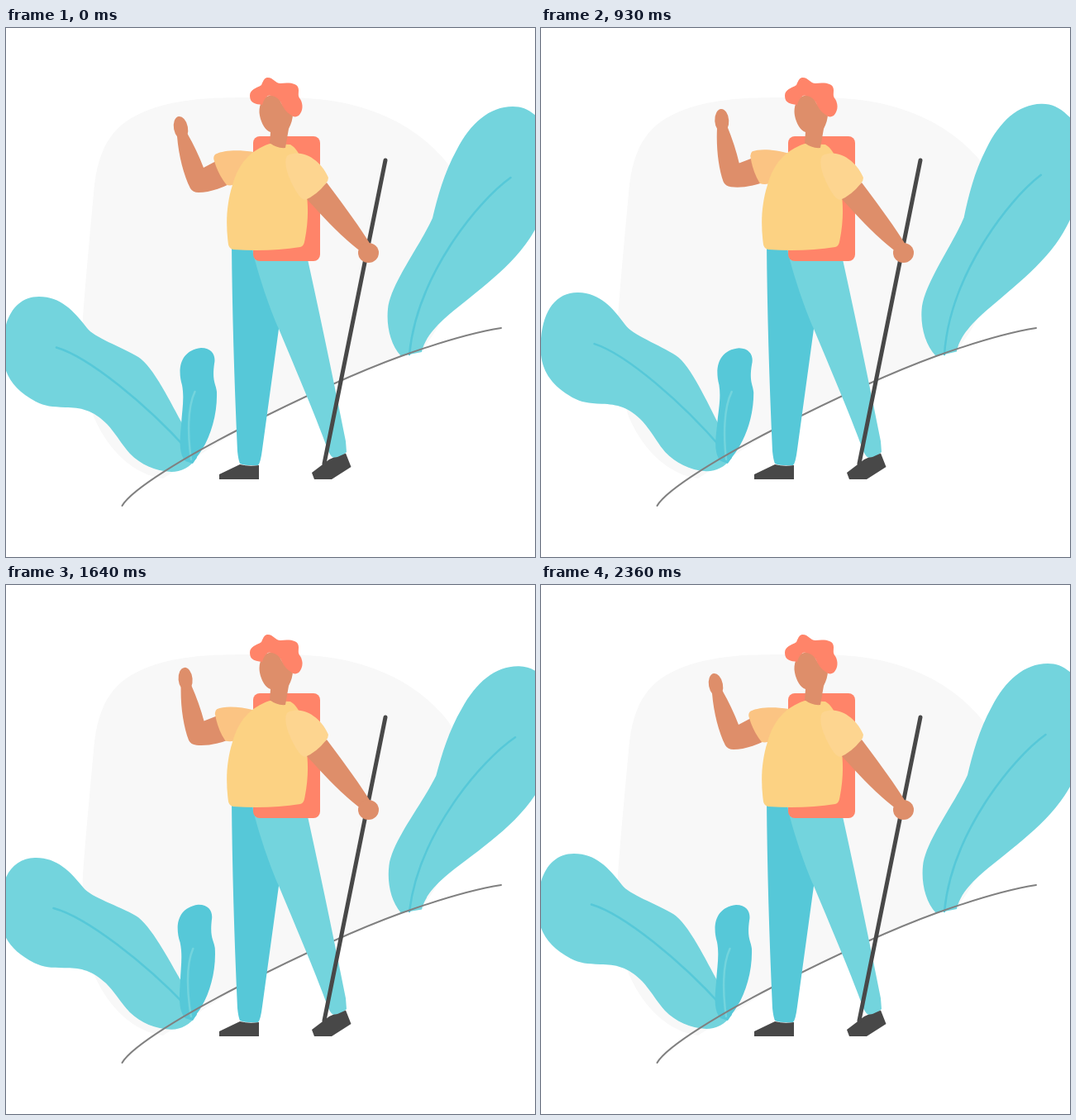
These frames come from a looping animation (640 by 640 pixels, 2430 ms). An HTML page:

```html
<!DOCTYPE html>
<html lang="en">
<head>
<meta charset="utf-8">
<title>Hiker</title>
<style>
  html, body { margin: 0; width: 100%; height: 100%; overflow: hidden; background: #fff; }
  svg { display: block; width: 100%; height: 100%; }
  .light { fill: #73d4dd; }
  .dark { fill: #56c8d8; }
  .skin { fill: #de8e6a; }
  .coral { fill: #ff8469; }
  .grey { fill: #484848; }
  .vein { fill: none; stroke: #56c8d8; stroke-width: 2.5; stroke-linecap: round; }
</style>
</head>
<body>
<svg viewBox="0 0 640 640">
  <path fill="#f8f8f8" d="M190 545C152 540 122 508 106 470C92 430 92 385 93 350C97 295 102 245 106 200C111 140 132 115 170 100C203 87 245 84 285 84C330 84 365 83 400 89C455 99 502 123 535 165C566 210 555 330 504 388L478 397Q420 418 283 485Z"/>

  <g id="leftLeaf">
    <path class="light" d="M231 520C222 532 212 537 200 537C180 536 163 528 150 515C140 504 134 492 122 479C105 462 90 459 72 459C55 458 48 458 36 452C8 437 -4 418 -4 390C-4 350 12 325 40 325C66 325 82 342 98 363C106 374 140 386 160 398C178 409 200 455 214 480C220 492 231 505 231 520Z"/>
    <path class="vein" d="M61 386.500C100 398 170 455 222 513"/>
  </g>
  <g id="smallLeaf">
    <path class="dark" d="M217 524C209 515 210 500 212 480C213 462 216 448 213 432C207 412 211 390 236 387C250 387 254 397 252 406C249 428 254 430 255 440C256 470 246 500 231 519L226 527Z"/>
    <path class="vein" style="stroke:#73d4dd" d="M228.500 440C219 460 220 495 224 522"/>
  </g>
  <g id="rightLeaf">
    <path class="light" d="M478 397C465 383 460 360 462 340C465 310 500 265 516 230C522 205 530 175 545 148C562 115 585 95 613 95C625 95 634 99 645 110C668 130 668 195 640 244C615 290 560 325 530 352C515 366 506 378 503 392Z"/>
    <path class="vein" d="M610.500 181C570 210 497 300 488 395"/>
  </g>

  <path fill="none" stroke="#808080" stroke-width="2" stroke-linecap="round" d="M140.500 578C152 558 218 518 283 485C350 451 420 418 478 397C520 382 560 369 599 363"/>

  <g id="arm">
    <path class="skin" d="M207 131C209 155 215 178 223 194Q226 199 233 199Q250 199 272 188L256 160L239 169Q231 148 219 127Z"/>
    <ellipse class="skin" cx="211.500" cy="121" rx="8.500" ry="14.200" transform="rotate(-11 211.500 121)"/>
    <path fill="#fbc483" d="M300 150C280 147 262 148 253 153Q250 156 252 161Q257 178 267 190Q275 192 285 185Z"/>
  </g>

  <path class="dark" d="M273 262H330V364L310 510Q308 526 305 529Q290 530 283 527Q281 522 280 512Q274 380 273 262Z"/>
  <path class="light" d="M297 265C306 302 320 342 330 364C345 400 375 470 390 512Q393 519 397 520Q406 519 412 513L411 500Q385 370 361 262Z"/>
  <path class="grey" d="M258 540L283 528Q294 531 306 529V546H258ZM370 538L391 522Q396 519 401 519L411 514.500L417.500 531L394 546H373Z"/>

  <rect class="coral" x="299" y="131" width="81" height="151" rx="8"/>
  <path fill="#fcd283" d="M319 140C295 148 281 165 274 190C266 215 266 240 269 262Q270 267 275 268Q318 271 356 265Q360 264 361 259C366 235 366 215 363 195C361 165 356 148 344 141Z"/>
  <path d="M459 160L385 527" stroke="#484848" stroke-width="5" stroke-linecap="round"/>
  <path class="skin" d="M364 207L388 187C405 210 425 236 441 262L430 271C400 248 382 226 364 207Z"/>
  <ellipse class="skin" cx="438.500" cy="272" rx="12.500" ry="12"/>
  <path fill="#fdd590" d="M343 153C362 146 383 163 390 181Q390 185 387 188Q376 202 362 208Q357 207 354 202C344 187 336 168 339 157Q340 154 343 153Z"/>

  <path class="skin" d="M318 82C309 84 305 96 307 106C309 116 314 124 320 126L319 139Q328 146 338 145L342 122Q347 112 347 104C340 95 335 98 331 86Q326 80 318 82Z"/>
  <path class="coral" d="M310 93C302 92 295 91 295 82C295 74 303 73 309 69C312 62 313 60 317 60C323 60 326 67 332 67C342 66 354 66 354 75C354 81 353 82 356 86C360 93 359 100 355 105C351 109 347 107 346 106C338 101 336 97 333 91C330 84 322 81 317 82Q312 85 310 93Z"/>
</svg>
<script>
  const LOOP = 2430, FPS = 14;
  // [time in ms, value] keys, joined by straight ramps
  const sway = [[0, 0], [600, 1], [960, 1], [1600, -1], [1920, -1], [2350, 0], [LOOP, 0]];
  const wave = [[0, 0], [940, 1], [1440, 1], [2340, 0], [LOOP, 0]];

  function at(keys, t) {
    const i = Math.max(1, keys.findIndex(k => k[0] >= t));
    const [t0, a] = keys[i - 1], [t1, b] = keys[i];
    return a + (b - a) * (t - t0) / (t1 - t0);
  }

  function turn(id, angle, x, y) {
    document.getElementById(id).setAttribute('transform', `rotate(${angle} ${x} ${y})`);
  }

  function draw(now) {
    const step = Math.floor((now % LOOP + 5) * FPS / 1000);
    const t = Math.min(step * 1000 / FPS, LOOP - 1);
    const s = 1.5 * at(sway, t);
    turn('leftLeaf', s, 231, 522);
    turn('smallLeaf', s, 226, 525);
    turn('rightLeaf', -s, 488, 395);
    turn('arm', 7.6 * at(wave, t), 282, 172);
  }

  const start = performance.now();
  function tick() {
    draw(performance.now() - start);
    requestAnimationFrame(tick);
  }
  tick();
</script>
</body>
</html>
```
